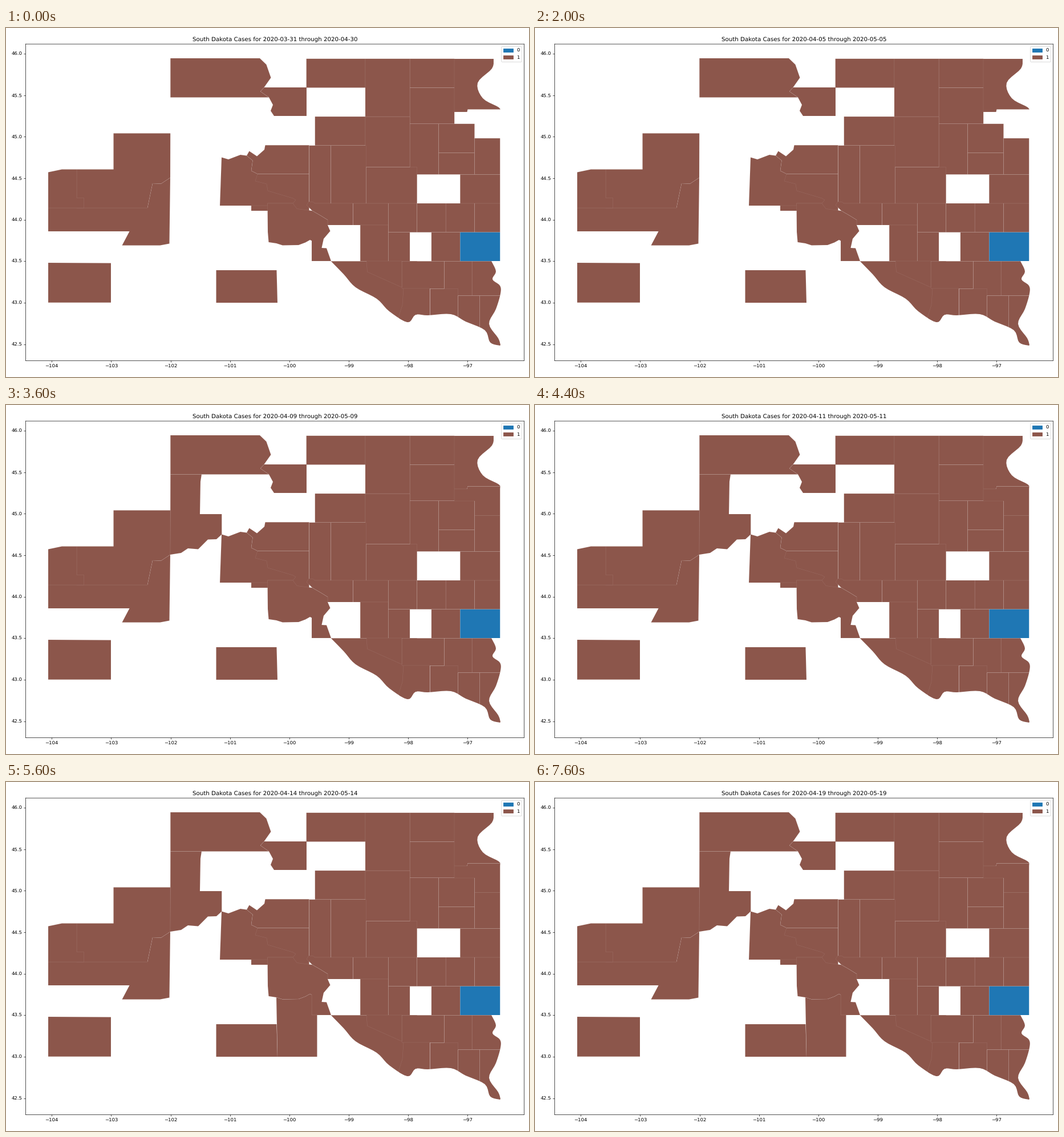
These frames come from a looping animation (917 by 611 pixels, 8 s). A matplotlib script:

```python
import matplotlib.pyplot as plt
import numpy as np
from matplotlib.animation import FuncAnimation
from matplotlib.patches import Patch, Polygon
from matplotlib.path import Path

W, H = 917, 611
DPI = W / 15
FRAMES, INTERVAL = 20, 400
BROWN, BLUE = "#8c564b", "#1f77b4"
LEFT, RIGHT, TOP, BOTTOM = 34.4, 908.4, 28.1, 582.4
EAST = 3.57  # state line, in townships

plt.rcParams.update({"font.family": "DejaVu Sans", "text.hinting": "none"})


def geo(points):
    """Stage pixels to longitude and latitude."""
    x, y = np.asarray(points, float).T
    return np.column_stack([(x - 80.2) / 104.17 - 104, 45 - (y - 190.4) / 145.3])


def box(x0, y0, x1, y1):
    return [(x0, y0), (x1, y0), (x1, y1), (x0, y1)]


def river(points, steps=5):
    """Catmull-Rom curve through a few bends."""
    p = np.array([points[0], *points, points[-1]], float)
    t = np.linspace(0, 1, steps, endpoint=False)[:, None]
    curve = [b + t / 2 * (c - a + t * (2 * a - 5 * b + 4 * c - d
                                       + t * (3 * (b - c) + d - a)))
             for a, b, c, d in zip(p, p[1:], p[2:], p[3:])]
    return [*np.vstack(curve), points[-1]]


fig = plt.figure(figsize=(W / DPI, H / DPI), dpi=DPI)
ax = fig.add_axes([LEFT / W, 1 - BOTTOM / H, (RIGHT - LEFT) / W, (BOTTOM - TOP) / H])
(west, south), (east, north) = geo([(LEFT, BOTTOM), (RIGHT, TOP)])
ax.set(xlim=(west, east), ylim=(south, north),
       xticks=np.arange(-104, -96), yticks=np.arange(42.5, 46.1, 0.5))
for spine in ax.spines.values():
    spine.set_snap(False)

big_stone = river([(855, 54), (852, 71), (827, 96), (836, 123), (864, 139), (866.5, 147)])
big_sioux = river([(851, 408), (859, 426), (853, 440), (866, 451), (867, 465),
                   (859, 492), (847, 518), (863, 543), (867, 555)])
missouri = river([(866, 556), (849, 550.5), (839.5, 529), (806, 514), (780, 501),
                  (739, 503), (718, 502), (704, 515), (672, 496), (650, 474),
                  (613, 454), (592, 431), (569.5, 408)])
state = Path(geo([(300, 40), (855, 40), *big_stone, (866.5, 408), *big_sioux,
                  *missouri, (300, 408)]))


def county(points, color=BROWN, clip=False):
    patch = ax.add_patch(Polygon(geo(points), fc=color, ec=(1, 1, 1, 0.12),
                                 lw=0.6, snap=False))
    if clip:
        patch.set_clip_path(state, ax.transData)
    return patch


def row(bottom, top, *edges, color=BROWN):
    """Neighbouring counties on the survey grid, measured in townships."""
    y0, y1 = (408.3 - 12.66 * v for v in (top, bottom))
    x = [821.5 + 12.6 * u for u in edges]
    for x0, x1 in zip(x, x[1:]):
        county(box(x0, y0, x1, y1), color, clip=True)


# West
meade_line = [(288, 262), (272, 272.5), (257, 272), (248, 315)]
county([(74, 315), *meade_line[::-1], (286.5, 377.5), (270, 380.6),
        (203.5, 380.6), (216.5, 356), (74, 356)])
county([(124, 247.5), (188.5, 247.5), (188.5, 184.4), (288.2, 184.4),
        *meade_line, (124, 315)])
county([(74, 252.5), (98, 247.5), (124, 247.5), (124, 297.5), (136.5, 297.5),
        (136.5, 315), (74, 315)])
county([(74, 411), (184, 411.6), (184, 480.7), (74, 480.7)])
county([(368.5, 424), (474.5, 424), (476, 481), (368.5, 481)])

# Along the upper river
bend = [(452.5, 104), (446, 111), (461, 121.5)]
county([(288.3, 53), (445, 53), (456.5, 64), (464.5, 87), *bend, (288.3, 121.5)])
county([*bend, (468, 134.5), (464, 145), (470, 154), (527, 154), (527, 104)])

oahe = [(422, 223.5), (432.5, 232), (430, 250), (441, 255.5)]
county(box(430, 255.5, 531.5, 320))
county([*oahe, (531.5, 255.5), (531.5, 205.2), (454.5, 205.2), (453, 213),
        (440, 224.5), (426.5, 215.5)])
county([(378, 226.5), (390, 230), (411, 222), *oahe, (437, 268), (457, 273),
        (459, 285), (503, 298), (508, 301), (503, 307), (458.5, 307),
        (458.5, 311), (375, 311)])

# Survey grid, north to south
row(24, 28, -23.4, -15.2)
row(20, 28, -15.2, -9)
row(24, 28, -9, -2.8)
row(19, 24, -9, -2.8)
row(16, 20, -22.2, -15.2)
row(13, 20, -15.2, -9)
row(12, 19, -9, -5)
row(15, 19, -5, 0)
row(12, 15, -5, 0)
row(12, 17, 0, EAST)
row(8, 16, -23, -20, -15.1)
row(8, 13, -15.1, -8)
row(8, 12, -2, EAST)
row(5, 8, -16.9, -12)
row(4, 8, -12, -8, -4, 0, EAST)
row(0, 5, -15.9, -12)
row(0, 4, -12, -9)
row(0, 4, -6, -2)
row(0, 4, -2, EAST, color=BLUE)
row(-12, 0, -20, -8)
row(-3.8, 0, -10.1, -4.2)
row(-4.75, 0, -4.2, -0.35, 4)
row(-12, -4.75, -2.3, 0.7, 4)
row(-12, -3.8, -6.2, -2.3)

# Counties with slanted or river sides
grant_line = [(868, 142.5), (809.5, 142.5), (808.5, 147), (786, 147)]
county([(786, 54), (868, 54), *grant_line], clip=True)
county([(632, 408), (694, 408), (694, 454), (633.5, 427)], clip=True)
county([(697, 456), (743, 456), (743, 520), (687, 520), (689, 504), (695, 485)],
       clip=True)

narrows = [(537, 320), (551, 328), (564, 336), (564, 345)]
county([(541.5, 307), (538, 304.5), (531, 304), (527, 310), *narrows,
        (608.5, 345), (608.5, 307)])
white_river = [(536, 408), (536, 372.5), (533, 371), (525, 375.5), (513, 380),
               (485, 380.5), (474, 377)]
county([(458.5, 307), (503, 307), (510, 316.5), *narrows, (568.5, 355.5),
        (557, 369), (553.5, 385), (562, 385.5), (570, 408), *white_river,
        (460.5, 375), (459, 357)])

# First day on which each group of counties is visible
arrivals = {
    6: [county([(288.3, 121.5), (343, 121.5), (341, 134), (340, 191), (378.3, 191),
                (378.3, 226.5), (369, 235), (354, 235.5), (337, 252.5), (319, 251),
                (307, 259), (288, 262)]),
        county([*grant_line, (786, 168), (821.5, 168), (821.5, 193.3),
                (866.5, 193.3), (866.5, 142.5)], clip=True)],
    14: [county([*white_river, (476, 481), (545.5, 481), (545.5, 408)])],
}

ax.legend(handles=[Patch(color=BLUE, label="0"), Patch(color=BROWN, label="1")],
          loc="upper right")
title = ax.set_title("")


def month_day(month, day):
    """Day 0 is the last day of the month before."""
    last = {4: "03-31", 5: "04-30"}
    return f"{month:02}-{day:02}" if day else last[month]


def draw(day):
    title.set_text(f"South Dakota Cases for 2020-{month_day(4, day)} "
                   f"through 2020-{month_day(5, day)}")
    for first_day, counties in arrivals.items():
        for patch in counties:
            patch.set_visible(day >= first_day)
    return [title]


anim = FuncAnimation(fig, draw, frames=FRAMES, init_func=lambda: draw(0),
                     interval=INTERVAL, repeat=True, repeat_delay=0)
plt.show()
```
